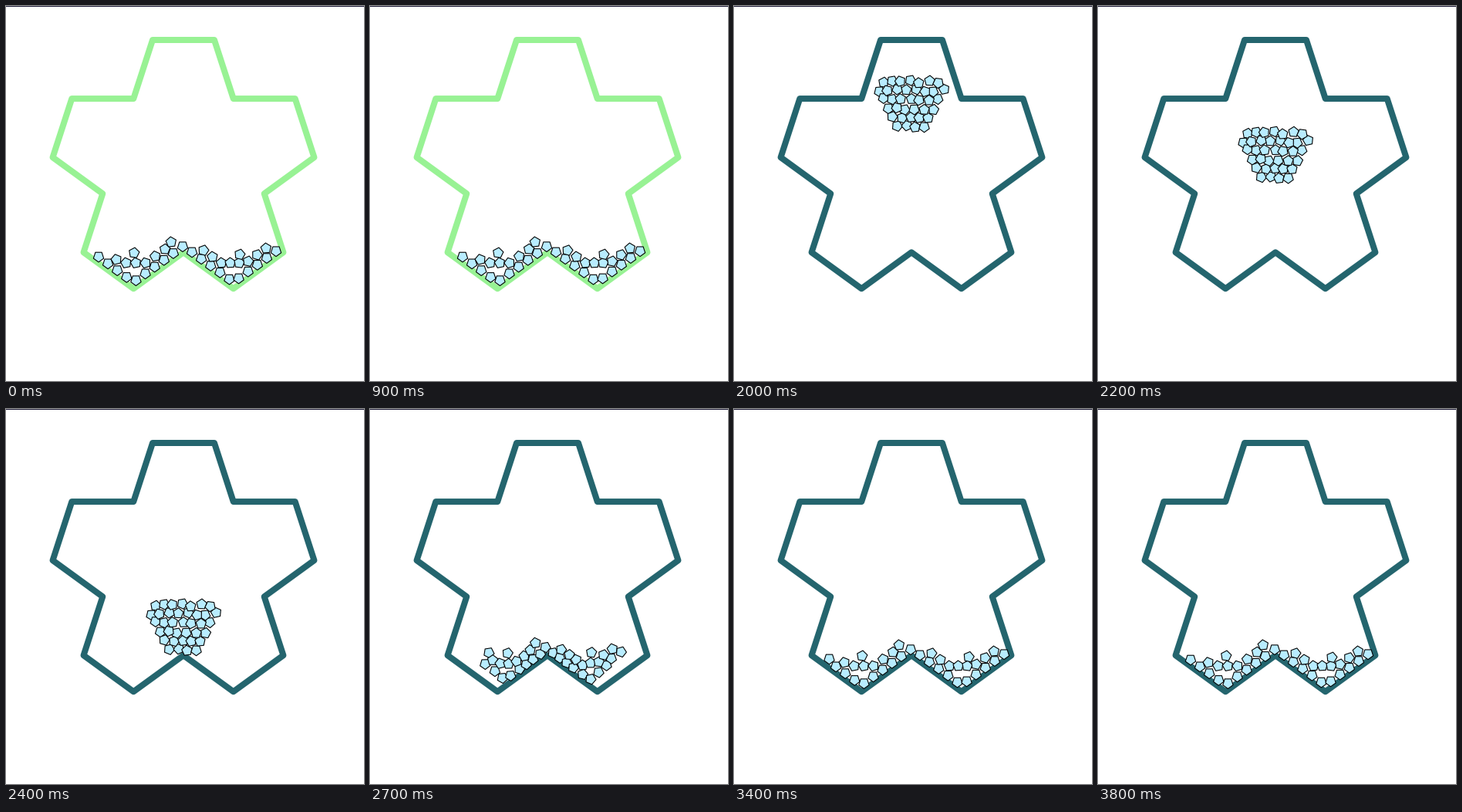
These frames come from a looping animation (464 px wide and 486 px high, 3.9 s). A matplotlib script:

```python
import matplotlib.pyplot as plt
import numpy as np
from matplotlib.animation import FuncAnimation
from matplotlib.collections import PolyCollection
from matplotlib.patches import Polygon, Rectangle

W, H, DPI = 464, 486, 64
PX = 72 / DPI
STEP, FRAMES = 100, 39
DROP, IMPACT, LANDED, REST = 1600, 2400, 3000, 3750
GREEN, TEAL = "#98f294", "#24656e"
RADIUS, PITCH = 7.0, 12.0
rng = np.random.default_rng(5)


def star_outline(start=(190, 44), side=80):
    """Walk round five arms of three equal sides each."""
    turns = np.radians([72 * (arm + bend) for arm in range(5)
                        for bend in (0, 1, 0)])
    steps = side * np.column_stack([np.cos(turns), np.sin(turns)])
    return np.array(start) + np.cumsum(steps, axis=0)


OUTLINE = star_outline()
FLOOR = OUTLINE[9:4:-1]


def floor_y(x):
    return np.interp(x, FLOOR[:, 0], FLOOR[:, 1])


def separate(points, rounds=12, gap=11.0):
    """Push overlapping pieces apart and keep them above the floor."""
    for _ in range(rounds):
        delta = points[:, None] - points[None]
        dist = np.hypot(delta[..., 0], delta[..., 1]) + np.eye(len(points)) * 1e3
        push = np.clip(gap - dist, 0, None) / np.maximum(dist, 1)
        points = points + 0.25 * (delta * push[..., None]).sum(axis=1)
        points[:, 1] = np.minimum(points[:, 1], floor_y(points[:, 0]) - 8.5)
    return points


def make_cluster():
    """Staggered rows, widest near the top, around the origin."""
    rows = [((i - (n - 1) / 2) * PITCH, (row - 2.5) * 11.6)
            for row, n in enumerate((7, 8, 7, 6, 5, 4)) for i in range(n)]
    return np.array(rows) + rng.uniform(-1.8, 1.8, (len(rows), 2))


def make_pile():
    """A layer along the floor, a second that fills the dips, three on top."""
    low = np.linspace(120, 350, 20)
    high = np.concatenate([np.linspace(143, 206, 6), np.linspace(256, 337, 8)])
    low_y = floor_y(low) - 8.5
    high_y = np.minimum(floor_y(high) - 21.5, 333)
    top = [(166, 320), (214, 306), (303, 322)]
    return np.vstack([np.column_stack([low, low_y]),
                      np.column_stack([high, high_y]), top])


def match(start, goal):
    """Reorder start by swaps so that each piece is near its goal."""
    order = np.arange(len(goal))
    cost = ((start[:, None] - goal[None]) ** 2).sum(axis=2)
    for _ in range(20):
        for i in range(len(goal)):
            for j in range(i):
                a, b = order[i], order[j]
                if cost[b, i] + cost[a, j] < cost[a, i] + cost[b, j]:
                    order[i], order[j] = b, a
    return start[order]


def ease_out(u, power=2):
    return 1 - (1 - np.clip(u, 0, 1)) ** power


def smooth(u):
    u = np.clip(u, 0, 1)
    return u * u * (3 - 2 * u)


settled = make_pile()
landed = settled.copy()
landed[0] += (16, -5)    # two pieces still roll after the pile has landed
landed[-1] += (6, -3)
cluster = match(make_cluster(), landed - (229, 330))

count = len(settled)
air_angle = np.radians(rng.uniform(-36, 36, count))
on_floor = floor_y(settled[:, 0]) - settled[:, 1] < 12
rest_angle = np.where(on_floor, np.radians(36),
                      np.radians(rng.uniform(-20, 20, count)))


def falling(ms):
    """The cluster swells from a tight clump while it accelerates."""
    t = (ms - DROP) / 1000
    spread = ease_out(t / 0.4)
    scale = np.array([0.63, 0.52]) * (1 - spread) + spread
    shift = (231 - 2 * spread, 65 + 37.5 * t + 293.75 * t * t)
    return cluster * scale + shift


def pose(ms):
    """Centres and angles of all pieces at a time in the loop."""
    if ms < DROP:
        return settled, rest_angle
    if ms <= IMPACT:
        return falling(ms), air_angle
    if ms < LANDED:
        u = (ms - IMPACT) / 480
        start = falling(IMPACT)
        mix = np.array([smooth(u), ease_out(u, 3)])
        points = start + (landed - start) * mix
        if u < 1:
            points = separate(points)
        return points, air_angle + (rest_angle - air_angle) * smooth(u)
    roll = ease_out((ms - LANDED) / (REST - LANDED))
    return landed + (settled - landed) * roll, rest_angle


def pentagons(points, angles):
    corners = angles[:, None] + np.arange(5) * 2 * np.pi / 5 - np.pi / 2
    ring = np.stack([np.cos(corners), np.sin(corners)], axis=2)
    return points[:, None] + RADIUS * ring


fig = plt.figure(figsize=(W / DPI, H / DPI), dpi=DPI, facecolor="white")
ax = fig.add_axes([0, 0, 1, 1])
ax.set_xlim(0, W)
ax.set_ylim(H, 0)
ax.axis("off")
ax.add_patch(Rectangle((0, 0), W, 1, color="#1f1c38", lw=0,
                       antialiased=False))
wall = ax.add_patch(Polygon(OUTLINE, fill=False, lw=8 * PX,
                            joinstyle="round", snap=False, zorder=2))
pieces = ax.add_collection(PolyCollection([], facecolor="#b8ecff",
                                          edgecolor="black", lw=1.1 * PX,
                                          zorder=3), autolim=False)


def draw(frame):
    ms = frame * STEP
    wall.set_edgecolor(GREEN if ms < DROP else TEAL)
    pieces.set_verts(pentagons(*pose(ms)))
    return wall, pieces


anim = FuncAnimation(fig, draw, frames=FRAMES, interval=STEP, repeat=True,
                     repeat_delay=0)
plt.show()
```
